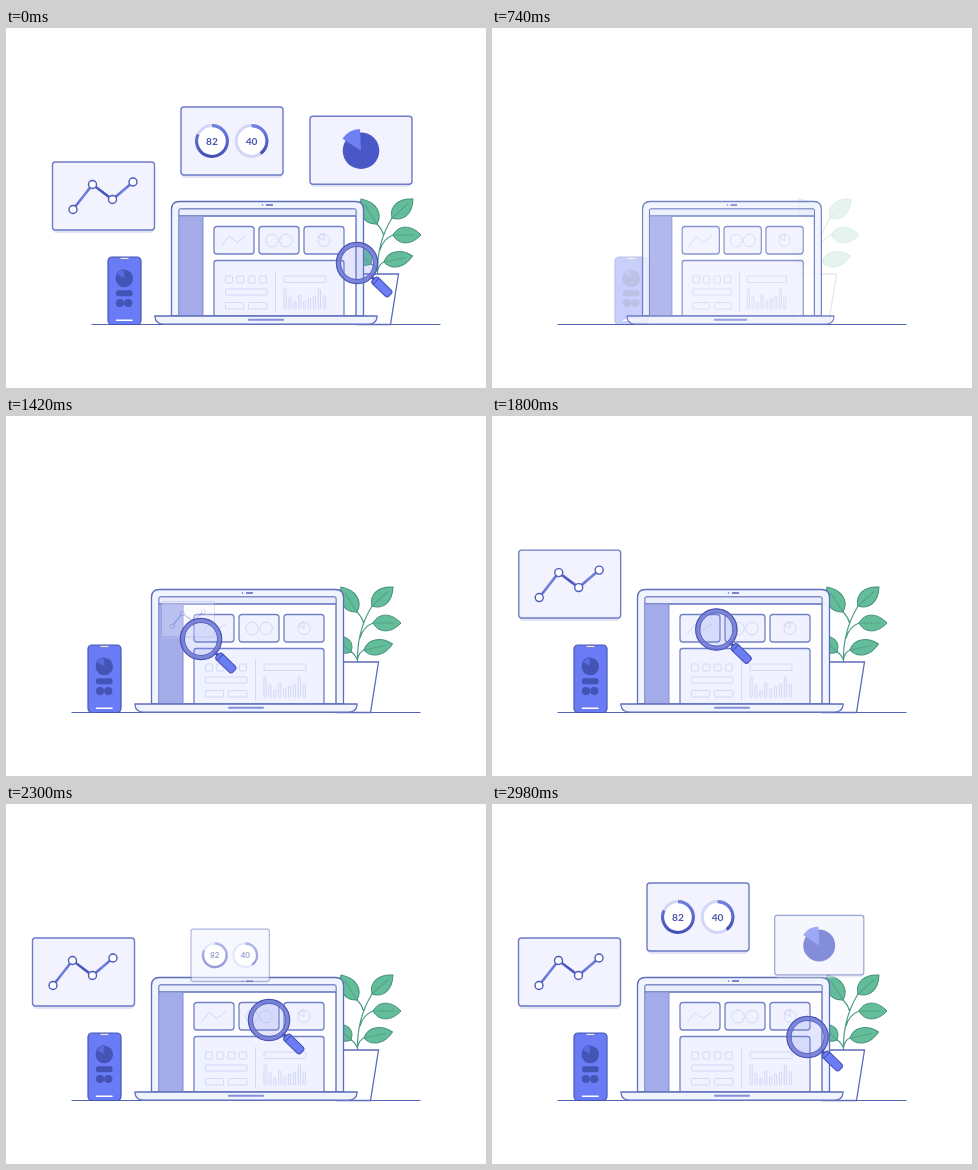
An HTML page that plays this animation: 480 px wide and 360 px high, repeating every 3000 ms.

```html
<!DOCTYPE html>
<html lang="en">
<head>
<meta charset="utf-8">
<title>Dashboard</title>
<style>
html, body { margin: 0; width: 100%; height: 100%; overflow: hidden; background: #fff; }
svg { display: block; width: 100vw; height: 100vh; }
text { font: 700 10.2px Lato, sans-serif; fill: #4b56ad; text-anchor: middle; }
.ink { stroke: #5d6cbb; stroke-width: 1.3; }
.pane { fill: #f1f2ff; stroke: #7181c8; stroke-width: 1.3; }
.faint { fill: none; stroke: #d3d8f4; stroke-width: 1; }
.leaf { fill: #64bd99; stroke: #45917f; stroke-width: 1; }
.stem { fill: none; stroke: #4d9a8c; stroke-width: 1.2; stroke-linecap: round; }
</style>
</head>
<body>
<svg viewBox="0 0 480 360">
  <defs>
    <linearGradient id="ring" x1="0" y1="0" x2="0" y2="1">
      <stop offset="0" stop-color="#7280df"/><stop offset="1" stop-color="#4350b6"/>
    </linearGradient>
    <linearGradient id="trend" gradientUnits="userSpaceOnUse" x1="0" x2="20" y1="0" y2="0" spreadMethod="reflect">
      <stop offset="0" stop-color="#4350b6"/><stop offset="1" stop-color="#7280df"/>
    </linearGradient>
  </defs>
  <g id="scene">
    <path id="ground" fill="none" stroke="#5264b4" stroke-width="1.1"/>
    <g id="plant"></g>
    <g id="phone">
      <rect x="82" y="229" width="33" height="67.5" rx="4" fill="#6a7bf6" stroke="#4656b5" stroke-width="1.2"/>
      <path d="M94 229.6h9v.6q0 1.4-1.5 1.4h-6q-1.500 0-1.500-1.400z" fill="#eef0ff" stroke="#4656b5" stroke-width=".6"/>
      <g fill="#4453b6">
        <circle cx="98.300" cy="250.500" r="8.700"/>
        <rect x="90" y="262.300" width="16.500" height="6" rx="2"/>
        <circle cx="94" cy="275" r="4.100"/><circle cx="102.300" cy="275" r="4.100"/>
      </g>
      <path d="M98.300 250.500L90.500 246A9 9 0 0 1 98.300 241.500Z" fill="#5a6be0" stroke="#4453b6" stroke-width=".6"/>
      <path d="M90.500 292.300h15.500" stroke="#fff" stroke-width="1.600" stroke-linecap="round"/>
    </g>
    <g id="laptop"></g>
    <g id="cards"></g>
    <g id="lens">
      <path d="M13 12.500L18 17.500" stroke="#4350b0" stroke-width="3"/>
      <g transform="rotate(44)" stroke="#4350b0" stroke-width="1">
        <rect x="23" y="-4.300" width="23" height="8.600" rx="3" fill="#6c7cf2"/>
        <path d="M26.500 -4.300V4.300" fill="none"/>
      </g>
      <circle r="17" fill="#7c88ea" fill-opacity=".22"/>
      <circle r="18.700" fill="none" stroke="#717bd6" stroke-opacity=".9" stroke-width="4.400"/>
      <circle r="20.700" fill="none" stroke="#4a55b2" stroke-width="1.200"/>
      <circle r="16.500" fill="none" stroke="#5561ba" stroke-width="1"/>
    </g>
  </g>
</svg>
<script>
const $ = id => document.getElementById(id);
const LOOP = 3000;
const lerp = (a, b, p) => a + (b - a) * p;
const part = (t, start, span) => Math.min(1, Math.max(0, (t - start) / span));
const ease = u => u < .5 ? 2 * u * u : 1 - 2 * (1 - u) * (1 - u);
const rect = (x, y, w, h, r, attrs) =>
  `<rect x="${x}" y="${y}" width="${w}" height="${h}" rx="${r}" ${attrs}/>`;

// Leaf from its base to its tip
function leaf(bx, by, tx, ty, w) {
  const len = Math.hypot(tx - bx, ty - by);
  const turn = Math.atan2(ty - by, tx - bx) * 180 / Math.PI;
  return `<g transform="translate(${bx} ${by}) rotate(${turn})">
    <path class="leaf" d="M0 0C${len * .2} ${-w} ${len * .65} ${-w} ${len} 0C${len * .65} ${w} ${len * .2} ${w} 0 0Z"/>
    <path class="stem" stroke-opacity=".7" d="M0 0H${len * .75}"/></g>`;
}

$('plant').innerHTML =
  `<path class="stem" d="M351.500 246C351 228 355 208 366 190M351 196Q356 201 357.500 207M367 207Q357 211 354 222M358 234Q353 236 351.600 243M344 235Q349 238 351.500 244"/>` +
  leaf(351, 196, 335, 171, 11) + leaf(366, 190, 387, 171, 10.5) + leaf(367, 207, 395, 207, 10.5) +
  leaf(358, 234, 386.5, 228, 10) + leaf(345, 236, 329, 221, 10) +
  `<path class="ink" fill="#fff" d="M322 246H372.500L364.500 296.500H330Z"/>`;

function laptop() {
  let s = '<path class="ink" fill="#f0f4ff" d="M145.500 288V181.500Q145.500 173.500 153.500 173.500H329.500Q337.500 173.500 337.500 181.500V288Z"/>';
  s += '<path class="ink" fill="#fff" d="M153 288V183Q153 181 155 181H328Q330 181 330 183V288Z"/>';
  s += '<path fill="#eaeeff" d="M153.600 181.600H329.400V188H153.600Z"/>';
  s += '<path class="ink" fill="none" d="M153 188H330"/>';
  s += rect(153.5, 188.5, 23.5, 99.5, 0, 'fill="#a3abe8"');
  s += '<path d="M177 188V288" stroke="#7f8cd0"/>';
  s += '<circle cx="236.500" cy="177" r=".8" fill="#5d6cbb"/><path d="M240 177h7" stroke="#5d6cbb" stroke-width="1.600"/>';
  for (let i = 0; i < 3; i++) s += rect(188 + 45 * i, 198.5, 40, 27.5, 3, 'class="pane"');
  s += '<path class="pane" d="M188 288V235Q188 232.500 190.500 232.500H315.500Q318 232.500 318 235V288Z"/>';
  s += '<path class="faint" d="M195 218.500L203 208.500L211 214.500L220 207.500M249.500 243V284"/>';
  s += '<circle class="faint" cx="246" cy="212.500" r="6.300"/><circle class="faint" cx="260" cy="212.500" r="6.300"/>';
  s += '<circle class="faint" cx="298" cy="212.500" r="6"/><path class="faint" d="M298 212.500L292 209A7 7 0 0 1 298 205.500Z"/>';
  for (let i = 0; i < 4; i++) s += rect(199.5 + 11.3 * i, 248, 7, 7, 1, 'class="faint"');
  s += rect(199.5, 261, 41.5, 6, 1, 'class="faint"') + rect(199.5, 274.5, 18, 6.5, 1, 'class="faint"');
  s += rect(222.5, 274.5, 18.5, 6.5, 1, 'class="faint"') + rect(258, 248, 42, 6.5, 1, 'class="faint"');
  [20, 12, 7, 14, 8, 11, 13, 20, 13].forEach((h, i) =>
    s += rect(258 + 4.9 * i, 281 - h, 2.2, h, .8, 'class="faint"'));
  s += '<path class="ink" fill="#f0f4ff" d="M129 288H351V289.500Q350 296.200 342 296.200H138Q130 296.200 129 289.500Z"/>';
  return s + '<path d="M223 291.800H257" stroke="#8290d4" stroke-width="2" stroke-linecap="round"/>';
}
$('laptop').innerHTML = laptop();

function gauge(x, value) {
  const r = 15.4, c = 2 * Math.PI * r;
  const a = value / 50 * Math.PI;
  return `<circle cx="${x}" r="${r}" fill="#fff" stroke="#d2d7f5" stroke-width="3"/>
    <path d="M${x} ${-r}A${r} ${r} 0 ${value > 50 ? 1 : 0} 1 ${x + r * Math.sin(a)} ${-r * Math.cos(a)}"
      fill="none" stroke="url(#ring)" stroke-width="3.100"/>
    <text x="${x}" y="3.600">${value}</text>`;
}

const points = [[-30.5, 13.5], [-11, -11.5], [9, 3.5], [29.5, -14]];
const art = [
  `<polyline points="${points.join(' ')}" fill="none" stroke="url(#trend)" stroke-width="2.600"/>` +
    points.map(([x, y]) => `<circle cx="${x}" cy="${y}" r="4" fill="#fff" stroke="#4b59b8" stroke-width="1.400"/>`).join(''),
  gauge(-20, 82) + gauge(19.6, 40),
  '<circle cy=".500" r="18.300" fill="#4a57c6"/><path d="M0 .500L-18.500 -11.500A21.500 21.500 0 0 1 -1 -21.300Z" fill="#6f80f2"/>'
];
// Each card flies from its small pane to its resting place
const cards = [
  { from: [208, 212], to: [77.5, 168], start: 1237 },
  { from: [253, 212], to: [206, 113], start: 1975 },
  { from: [298, 212], to: [335, 122.2], start: 2588 }
];
$('cards').innerHTML = art.map(a => '<g>' + rect(-50, -30, 100, 67, 3, 'fill="#e2e5f6"') +
  rect(-51, -34, 102, 68, 3, 'fill="#f2f3ff" stroke="#6c7ac8" stroke-width="1.400"') + a + '</g>').join('');
cards.forEach((c, i) => c.el = $('cards').children[i]);

const heights = [[1060, 238], [1420, 223], [1800, 213.5], [2300, 216], [2540, 223], [2980, 233], [3180, 235]];
function lensY(t) {
  const k = heights, n = k.length - 1;
  t = Math.min(k[n][0], Math.max(k[0][0], t));
  let i = 0;
  while (i < n - 1 && t > k[i + 1][0]) i++;
  const slope = j => {
    const a = k[Math.max(0, j - 1)], b = k[Math.min(n, j + 1)];
    return (b[1] - a[1]) / (b[0] - a[0]);
  };
  const [t0, y0] = k[i], [t1, y1] = k[i + 1], d = t1 - t0, u = (t - t0) / d, v = 1 - u;
  return v * v * (1 + 2 * u) * y0 + u * u * (1 + 2 * v) * y1 + d * u * v * (v * slope(i) - u * slope(i + 1));
}

function place(el, transform, opacity) {
  el.setAttribute('transform', transform);
  el.setAttribute('opacity', opacity);
}

function draw(now) {
  // The loop opens on the finished scene, set a little to the right
  const opening = now < 20;
  const t = opening ? 3180 : now;
  $('scene').setAttribute('transform', `translate(${opening ? 20 : 0} 0)`);

  const g = ease(part(t, 205, 340));
  $('ground').setAttribute('d', g ? `M${lerp(240, 65.5, g)} 296.500H${lerp(240, 414.5, g)}` : '');

  const l = ease(part(t, 340, 560));
  place($('laptop'), `translate(219 0) scale(${lerp(.58, 1, l)} 1) translate(-219 0)`, l);
  const ph = part(t, 540, 560), pl = part(t, 600, 560);
  place($('phone'), `translate(${55 * (1 - ease(ph))} 0)`, ph);
  place($('plant'), `translate(${-32 * (1 - ease(pl))} 0)`, pl * .3 + ease(pl) * .7);

  for (const c of cards) {
    const u = part(t, c.start, 580), p = ease(u);
    const x = lerp(c.from[0], c.to[0], p), y = lerp(c.from[1], c.to[1], p);
    place(c.el, `translate(${x} ${y}) scale(${lerp(.4, 1, p)})`, u);
  }
  place($('lens'), `translate(${195 + .0773 * (t - 1420)} ${lensY(t)})`, part(t, 1060, 220));
}

let first;
function tick(now) {
  if (first === undefined) first = now;
  draw((now - first) % LOOP);
  requestAnimationFrame(tick);
}
draw(0);
requestAnimationFrame(tick);
</script>
</body>
</html>
```
